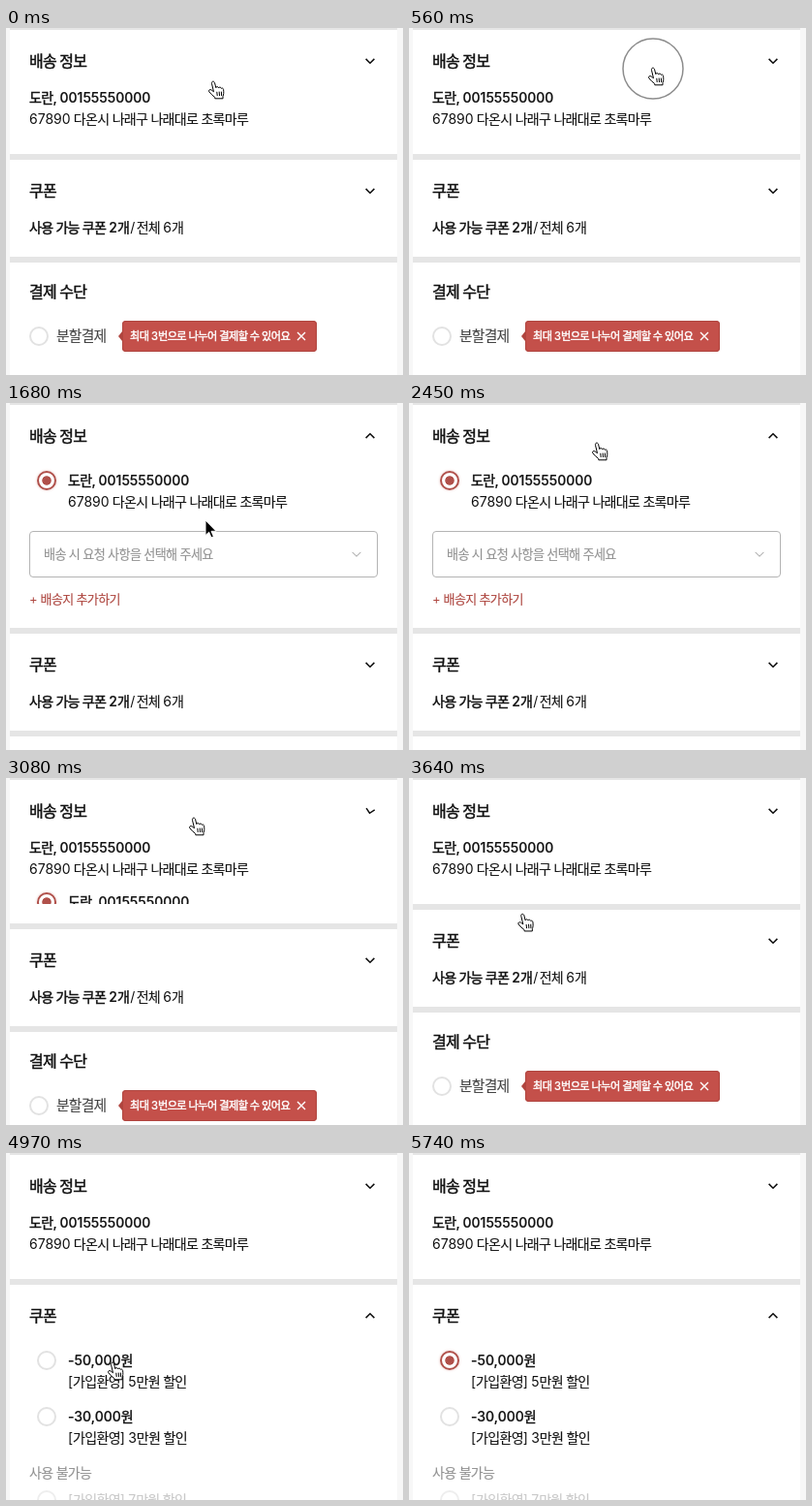
An HTML page that plays this animation: 410x358 px, repeating every 6090 ms.

```html
<!DOCTYPE html>
<html lang="ko">
<head>
<meta charset="utf-8">
<title>주문 결제</title>
<style>
html, body { margin: 0; width: 100%; height: 100%; overflow: hidden; background: #f7f7f7; }
body { position: relative; color: #111; font-family: Inter, "Noto Sans CJK KR", "Noto Sans CJK", sans-serif; }
main { position: absolute; left: 4px; top: 0; width: 400px; height: 100%; background: #e5e5e5; overflow: hidden; }
section, section * { box-sizing: border-box; }
section { position: absolute; left: 0; width: 400px; background: #fff; overflow: hidden; }
p, .list, .radio, .select, .tip, svg { position: absolute; margin: 0; }
p { line-height: 20px; white-space: pre; word-spacing: -.05em; }
p span { letter-spacing: -.05em; -webkit-text-stroke: .12px; }
b, .bold { font-weight: 500; -webkit-text-stroke: .2px; }
b span, .bold span { -webkit-text-stroke: .45px; }
.list { left: 0; width: 400px; overflow: hidden; }
.radio { width: 20px; height: 20px; border: 2px solid #e2e2e2; border-radius: 50%; background: #fff; }
.radio.on { border-color: #b0504a; background: radial-gradient(circle, #b0504a 4.3px, #fff 5.1px); box-shadow: 0 0 3px #e3bdb9; }
.radio.off { border-color: #eee; }
.select { left: 20px; top: 70px; width: 360px; height: 48px; border: 1px solid #b4b4b4; border-radius: 4px; }
.tip { left: 116px; top: 60px; width: 201px; height: 32px; border-radius: 4px; background: #c4504a; box-shadow: inset 0 0 0 1px #b0453f; }
.tip::before { content: ""; position: absolute; left: -4px; top: 11px; border: solid transparent; border-width: 5px 4px 5px 0; border-right-color: #b0453f; }
.red { color: #ae4740; }
.gray { color: #929292; }
.faint { color: #c9c9c9; }
.soft { color: #444; }
.white { color: #fff; }
svg { fill: none; overflow: visible; }
#cursor { left: 0; top: 0; width: 1px; height: 1px; }
</style>
</head>
<body>
<main>
  <section id="ship"></section>
  <section id="coupon"></section>
  <section id="pay"></section>
</main>
<svg id="cursor">
  <circle id="ring" r="31" stroke="#000" stroke-opacity=".45" stroke-width="1.5"/>
  <g id="hand" stroke="#000" stroke-linejoin="round" stroke-linecap="round">
    <path fill="#fff" d="M-1.6 1C-2-1.2.9-1.6 1.5.5L2.8 5.6C3 4.3 5.2 4.2 5.7 5.8C6 4.6 8 4.8 8.5 6.4C9.2 5.6 10.4 6.2 10.6 7.5C11 11 10.8 12.5 10 14.5V16.8H1.8V15.5C-.5 13.8-2.5 12-4.2 9.8C-5.3 8.2-3.2 6.8-1.8 8L.2 9.5Z"/>
    <path d="M3.8 10.2L4.2 13.6M6.2 10L6.5 13.6M8.4 10L8.6 13.6"/>
  </g>
  <path id="arrow" fill="#000" stroke="#fff" d="M0 0V15.5L3.6 12.2L6 17.8L8.4 16.8L6 11.3H11Z"/>
</svg>
<script>
const LOOP = 6090, STEP = 70, SLIDE = 248, SPIN = 220;
const SHIP_LIST = 129, COUPON_LIST = 300;
const $ = id => document.getElementById(id);

// y is the vertical middle of the line
const text = (x, y, size, str, cls = '') =>
  `<p class="${cls}" style="left:${x}px;top:${y - 10}px;font-size:${size}px">` +
  str.replace(/[가-힣]+/g, '<span>$&</span>') + '</p>';
const radio = (x, y, cls = '', id = '') =>
  `<div class="radio ${cls}" id="${id}" style="left:${x - 10}px;top:${y - 10}px"></div>`;
const icon = (x, y, d, color, width, id = '') =>
  `<svg id="${id}" width="20" height="20" viewBox="-10 -10 20 20" style="left:${x - 10}px;top:${y - 10}px">` +
  `<path d="${d}" stroke="${color}" stroke-width="${width}"/></svg>`;
const DOWN = 'M-4.4-2.1L0 2.3L4.4-2.1';
const header = (id, title) => text(20, 32, 16, title, 'bold') + icon(372, 32, DOWN, '#111', 1.5, id + 'Mark');
const item = (y, top, bottom, cls = '', id = '') =>
  radio(38, y, cls, id) + text(60, y, 14, top, 'bold') + text(60, y + 22, 14, bottom);

const who = '도란, 00155550000';
const where = '67890 다온시 나래구 나래대로 초록마루';

$('ship').innerHTML = header('ship', '배송 정보') +
  `<div id="shipBrief">${text(20, 70, 14, who, 'bold')}${text(20, 92, 14, where)}</div>` +
  `<div class="list" id="shipList">${item(18, who, where, 'on')}
    <div class="select">${text(14, 23, 13.1, '배송 시 요청 사항을 선택해 주세요', 'gray')}${icon(337, 23, DOWN, '#999', 1)}</div>
  </div>` +
  `<div id="addLink" style="position:absolute">${text(20, 11, 13, '+ 배송지 추가하기', 'red')}</div>`;

$('coupon').innerHTML = header('coupon', '쿠폰') +
  `<div id="couponBrief">${text(20, 70, 14, '<b>사용 가능 쿠폰 2개</b>&hairsp;/&hairsp;전체 6개')}</div>` +
  `<div class="list" id="couponList">
    ${item(18, '-50,000원', '[가입환영] 5만원 할인', '', 'pick')}
    ${item(76, '-30,000원', '[가입환영] 3만원 할인')}
    ${text(20, 134, 14, '사용 불가능', 'gray')}
    ${radio(38, 162, 'off')}${text(60, 162, 14, '[가입환영] 7만원 할인', 'faint')}
  </div>`;

$('pay').innerHTML = text(20, 30, 16, '결제 수단', 'bold') + radio(30, 76) + text(48, 76, 14.8, '분할결제', 'soft') +
  `<div class="tip">${text(8, 16, 11.2, '최대 3번으로 나누어 결제할 수 있어요', 'white bold')}
    ${icon(185, 16, 'M-4-4L4 4M4-4L-4 4', '#fff', 1.4)}</div>`;
$('pay').style.height = '400px';

// pointer tip: time, x, y
const path = [
  [0, 214, 56], [140, 252, 43], [210, 252, 43], [280, 252, 42], [1610, 252, 42],
  [1680, 206, 121], [1960, 140, 229], [2240, 189, 61], [2450, 194, 42], [3290, 194, 42],
  [3710, 102, 161], [4620, 102, 161], [4830, 85, 195], [4970, 110, 217], [5530, 110, 217],
  [5670, 191, 338], [5740, 200, 400], [LOOP, 200, 400]
];

function pointer(t) {
  const i = path.findIndex(k => k[0] > t);
  const [t0, x0, y0] = path[i - 1], [t1, x1, y1] = path[i];
  const k = (t - t0) / (t1 - t0);
  return [x0 + (x1 - x0) * k, y0 + (y1 - y0) * k];
}

function ease(t, start, length) {
  const k = Math.min(1, Math.max(0, (t - start) / length));
  return k * k * (3 - 2 * k);
}

const show = (id, on) => $(id).style.display = on ? '' : 'none';
const between = (t, a, b) => t >= a && t < b;
const turn = (id, amount) => $(id).style.transform = `rotate(${180 * amount}deg)`;

function place(id, top, height) {
  $(id).style.top = top + 'px';
  if (height !== undefined) $(id).style.height = height + 'px';
}

function draw(t) {
  // shipping panel: the brief returns at once when closing
  const open = 631, close = 2894;
  const shipOpen = between(t, open, close);
  const h = Math.round(SHIP_LIST * (ease(t, open, SLIDE) - ease(t, close, SLIDE)));
  const listTop = shipOpen ? 60 : 108;
  const shipHeight = listTop + h + (shipOpen ? 41 : 20);
  show('shipBrief', !shipOpen);
  show('addLink', shipOpen);
  place('shipList', listTop, h);
  place('addLink', listTop + h);
  place('ship', 2, shipHeight);
  turn('shipMark', ease(t, open, SPIN) - ease(t, close, SPIN));

  // coupon panel
  const unfold = 3915;
  const couponOpen = t >= unfold;
  const g = Math.round(COUPON_LIST * ease(t, unfold, SLIDE));
  const couponTop = shipHeight + 8;
  const couponHeight = couponOpen ? 80 + g : 100;
  show('couponBrief', !couponOpen);
  place('couponList', 60, g);
  place('coupon', couponTop, couponHeight);
  turn('couponMark', ease(t, unfold, SPIN));
  $('pick').classList.toggle('on', t >= 5110);

  place('pay', couponTop + couponHeight + 6);

  // pointer
  const [x, y] = pointer(t);
  const arrow = between(t, 1680, 2240);
  $('cursor').style.transform = `translate(${x}px,${y}px)`;
  show('arrow', arrow);
  show('hand', !arrow);
  show('ring', [560, 2800, 3780].some(c => between(t, c, c + 140)));
}

function tick() {
  const t = performance.now() % LOOP;
  draw(Math.floor(t / STEP) * STEP);
  requestAnimationFrame(tick);
}
tick();
</script>
</body>
</html>
```
